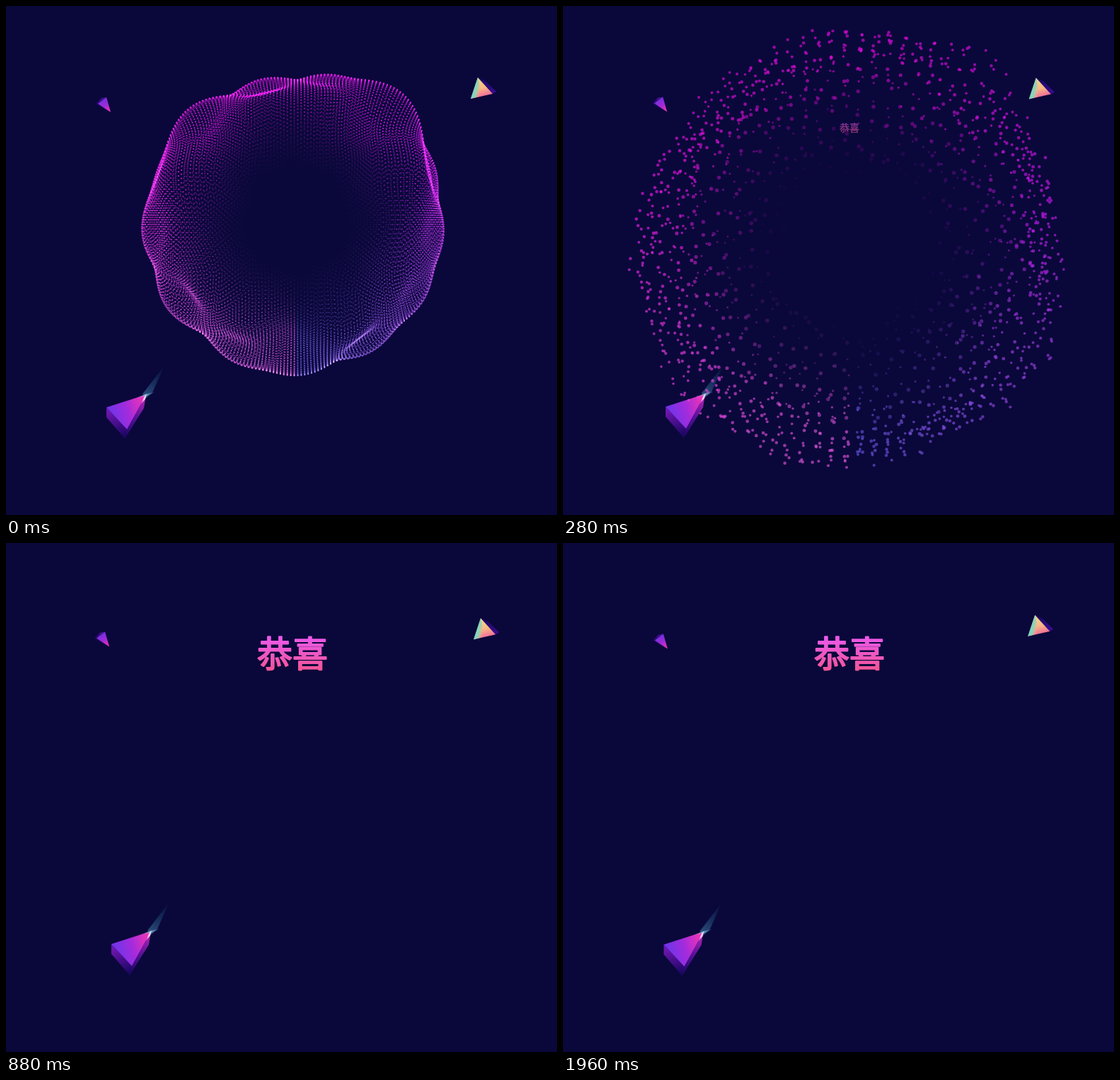
An HTML page with a canvas that plays this animation: 779 px wide and 719 px high, repeating every 2000 ms.

```html
<!DOCTYPE html>
<html lang="zh">
<head>
<meta charset="utf-8">
<style>
html, body { margin: 0; width: 100%; height: 100%; overflow: hidden; background: #0a083a; }
canvas { display: block; }
</style>
</head>
<body>
<canvas id="stage" width="779" height="719"></canvas>
<script>
const ctx = document.getElementById('stage').getContext('2d');
const LOOP = 2000, STEP = 40, TAU = Math.PI * 2;
const clamp = v => Math.max(0, Math.min(1, v));
const ease = k => k * k * (3 - 2 * k);
const progress = (t, start, end) => clamp((t - start) / (end - start));

let seed = 7;
function random() {
  seed = (seed * 16807) % 2147483647;
  return seed / 2147483647;
}

// Surface ripples: lobes around the orb, height, phase, turn per second, twist in depth
const WAVES = [
  { lobes: 2, height: 4, phase: 1.2, turn: 3, twist: 2 },
  { lobes: 3, height: 6, phase: 2.4, turn: 5, twist: -3 },
  { lobes: 4, height: 5, phase: -2.3, turn: 1, twist: 5 },
  { lobes: 5, height: 7, phase: -1.6, turn: -3, twist: -6 },
  { lobes: 8, height: 4.5, phase: 0.3, turn: 4, twist: 7 }
];

function dotColor(angle) {
  const fromBottom = ((TAU / 4 - angle) / TAU + 1) % 1;
  const hue = 301 - 55 * Math.max(0, 1 - fromBottom * 1.9) ** 2;
  const low = (1 + Math.sin(angle)) / 2;
  return `hsl(${hue.toFixed()},${(90 - 25 * low).toFixed()}%,${(44 + 15 * low).toFixed()}%)`;
}

// Points on a sphere, set in rings around the horizontal axis
function makeDots(rings, most, jitter) {
  const dots = [];
  for (let i = 0; i < rings; i++) {
    const lat = (i + 0.5) / rings * Math.PI;
    const count = Math.max(3, Math.round(most * Math.sin(lat)));
    for (let j = 0; j < count; j++) {
      const lon = (j + (i % 2) / 2 + jitter * (random() - 0.5)) / count * TAU;
      const x = Math.cos(lat + jitter * (random() - 0.5) * 0.03);
      const y = Math.sin(lat) * Math.sin(lon), z = Math.sin(lat) * Math.cos(lon);
      const s = Math.hypot(x, y), angle = Math.atan2(y, x);
      const depth = 1 - 0.13 * jitter * random();
      if (s > 0.34) dots.push({ s, z, angle, depth, color: dotColor(angle) });
    }
  }
  return dots;
}
const fine = makeDots(140, 200, 0);
const coarse = makeDots(46, 60, 0.9);

function orbPose(t) {
  const turn = progress(t, 0, 120), spread = ease(progress(t, 120, 280));
  const burst = 1 - (1 - progress(t, 280, 440)) ** 2;
  return {
    x: 410 - 9 * turn + 9 * spread,
    y: 302 - 3 * turn + 44 * spread,
    radius: 209 - 5 * turn + 106 * spread + 50 * burst,
    swell: 1 + 0.4 * spread
  };
}

function drawDots(dots, pose, t, alpha, round) {
  if (alpha <= 0) return;
  ctx.save();
  ctx.globalCompositeOperation = round ? 'source-over' : 'screen';
  for (const { s, z, angle, depth, color } of dots) {
    let r = pose.radius;
    for (const { lobes, height, phase, turn, twist } of WAVES)
      r += pose.swell * height * Math.cos(lobes * angle + phase + turn * t / 1000 + twist * z);
    r *= s * depth;
    const x = pose.x + r * Math.cos(angle), y = pose.y + r * Math.sin(angle);
    ctx.fillStyle = color;
    ctx.globalAlpha = alpha * clamp((s - 0.34) / 0.55) ** 1.3;
    if (round) {
      ctx.beginPath();
      ctx.arc(x, y, 2.1 + z * 0.8, 0, TAU);
      ctx.fill();
    } else ctx.fillRect(x - 0.9, y - 0.9, 1.8, 1.8);
  }
  ctx.restore();
}

function drawOrb(t) {
  if (t >= 440) return;
  const pose = orbPose(t), swap = progress(t, 140, 250);
  drawDots(fine, pose, t, 0.6 * (1 - swap), false);
  drawDots(coarse, pose, t, 0.66 * swap * (1 - progress(t, 280, 440)), true);
}

function shade(x0, y0, x1, y1, ...colors) {
  const g = ctx.createLinearGradient(x0, y0, x1, y1);
  colors.forEach((c, i) => g.addColorStop(i / (colors.length - 1), c));
  return g;
}

function poly(fill, ...pts) {
  ctx.fillStyle = fill;
  ctx.beginPath();
  for (let i = 0; i < pts.length; i += 2) ctx.lineTo(pts[i], pts[i + 1]);
  ctx.fill();
}

function drawLarge() {
  poly(shade(150, 572, 164, 608, '#6d16ae', '#1d0666'), 142, 567, 171, 598, 168, 611, 142, 581);
  poly(shade(197, 556, 168, 609, '#a823b4', '#55109a', '#1d0666'), 198, 549, 195, 568, 168, 611, 171, 598);
  poly(shade(145, 570, 195, 556, '#6e35ea', '#a42bdc', '#f235b4'), 142, 567, 198, 549, 171, 598);
  poly(shade(224, 508, 198, 552, '#2f78a000', '#2f80ac48', '#6cc0e060'), 224, 508, 207, 546, 198, 554, 193, 548);
  poly(shade(182, 554, 212, 545, '#58b8e000', '#a8e8ff90', '#58b8e000'), 182, 554, 198, 548, 212, 545, 199, 551);
  poly(shade(200, 549, 190, 564, '#e8ffff', '#ffc8ff', '#ff80e000'), 199, 548, 197, 555, 190, 564, 195, 553);
}

function drawGold() {
  poly(shade(672, 106, 692, 122, '#1a0668', '#3a0a92'), 667, 101, 678, 106, 693, 121, 688, 124);
  poly(shade(667, 103, 674, 130, '#f6d690', '#f8b884', '#f0609e'), 667, 101, 688, 124, 657, 131);
  poly(shade(658, 118, 671, 121, '#62dccb', '#8fd3b8', '#f0b88a00'), 667, 101, 673, 127, 657, 131);
}

function drawSmall() {
  poly(shade(127, 138, 141, 132, '#1b0660', '#4a149c'), 142, 129, 135, 130, 127, 138, 148, 150, 131, 138);
  poly(shade(136, 131, 146, 149, '#7430e0', '#9a2bd8', '#ee32b4'), 142, 129, 148, 150, 130, 138);
}

// Each solid drifts out and back, with a slower dip and rise on top
function drift(draw, t, reachX, reachY, bob) {
  const out = Math.sin(Math.PI * t / LOOP), wave = Math.sin(TAU * t / LOOP);
  ctx.save();
  ctx.translate(reachX * out, reachY * out + bob * wave);
  draw();
  ctx.restore();
}

function drawTitle(t) {
  const k = progress(t, 200, 485);
  if (!k) return;
  ctx.save();
  ctx.translate(405, 156 + 22 * (1 - k));
  ctx.scale(k, k);
  ctx.globalAlpha = clamp(k * 1.5);
  ctx.font = '500 50px "Noto Sans CJK SC", "Noto Sans CJK", sans-serif';
  ctx.textAlign = 'center';
  ctx.lineJoin = 'round';
  ctx.lineWidth = 2;
  ctx.fillStyle = ctx.strokeStyle = shade(0, -24, 0, 24, '#ea58ec', '#ee58c4', '#f25494');
  ctx.fillText('恭喜', 0, 19);
  ctx.strokeText('恭喜', 0, 19);
  ctx.restore();
}

function frame(now) {
  const t = Math.floor((now % LOOP) / STEP) * STEP;
  ctx.fillStyle = '#0a083a';
  ctx.fillRect(0, 0, 779, 719);
  drift(drawLarge, t, 7, 0, -1.3);
  drift(drawGold, t, 4.2, 6.5, -2.8);
  drift(drawSmall, t, -2, -4, 1.5);
  drawOrb(t);
  drawTitle(t);
  requestAnimationFrame(frame);
}
frame(0);
</script>
</body>
</html>
```
